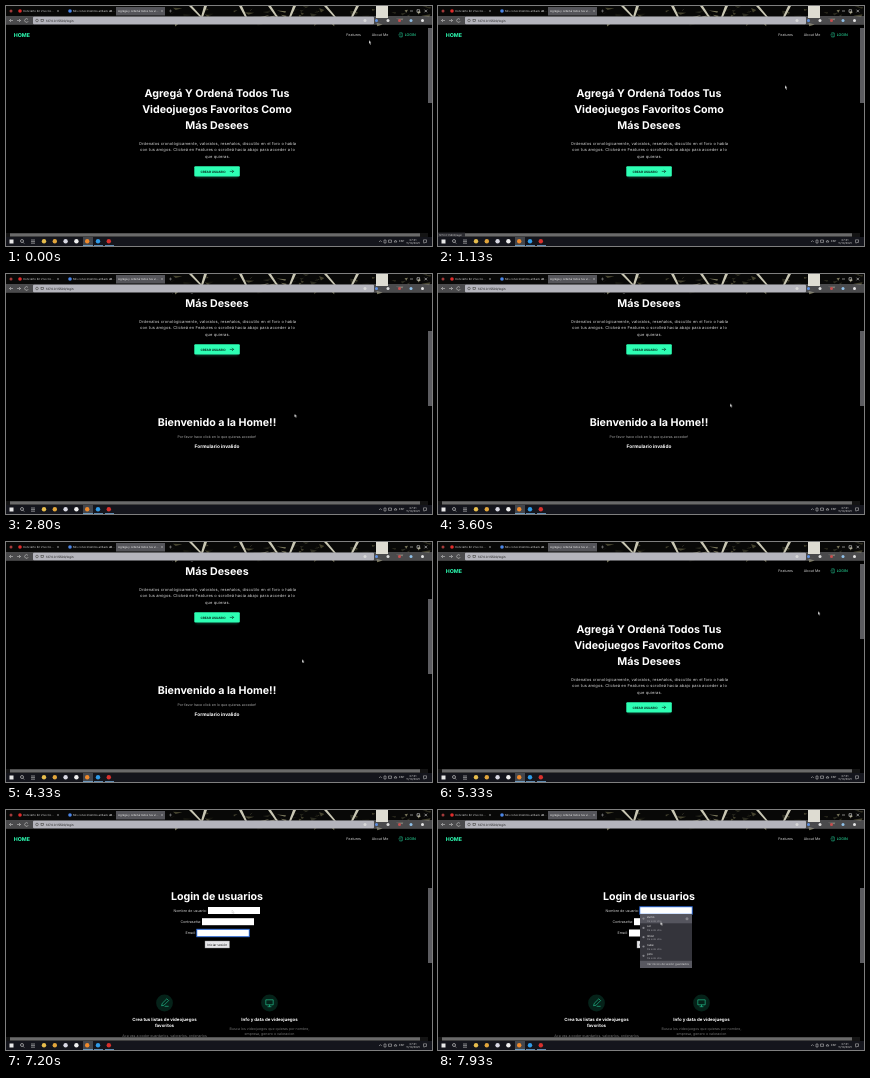
An HTML page that plays this animation: 426x240 px, repeating every 8000 ms.

```html
<!DOCTYPE html>
<html lang="es">
<head>
<meta charset="utf-8">
<title>Videojuegos</title>
<style>
  html, body { margin: 0; width: 100%; height: 100%; overflow: hidden; background: #000; }
  svg { display: block; width: 100vw; height: 100vh; }
  text { font-family: Inter, "Open Sans", sans-serif; font-size: 3.6px; fill: #d0d0d0; text-rendering: geometricPrecision; }
  .mid { text-anchor: middle; }
  .end { text-anchor: end; }
  .title { font-size: 10.67px; font-weight: 700; fill: #fff; }
  .lead { font-size: 4px; letter-spacing: .14px; fill: #d8d8d8; }
  .sub { font-size: 4.4px; font-weight: 700; fill: #fff; }
  .dim { font-size: 3.55px; fill: #737373; }
  .teal { fill: #2dffb4; }
  .small { font-size: 2.8px; }
  .line { fill: none; stroke: #2df0b2; stroke-width: .5; }
  .hidden { opacity: 0; }
</style>
</head>
<body>
<svg viewBox="0 0 426 240" preserveAspectRatio="none">
  <defs>
    <clipPath id="view"><rect y="19" width="422" height="208"/></clipPath>
    <filter id="glow" x="-30%" y="-60%" width="160%" height="250%"><feGaussianBlur stdDeviation="1"/></filter>
    <g id="nav">
      <text x="7.8" y="30.9" class="teal" style="font-size:5.3px;font-weight:700">HOME</text>
      <text x="340.3" y="30.3">Features</text>
      <text x="365.8" y="30.3">About Me</text>
      <path class="line" d="M393.6 27.5v-.6h2.6v4h-2.6v-.6M392.4 28.9h2.4"/>
      <text x="398.7" y="30.3" class="teal">LOGIN</text>
    </g>
  </defs>
  <rect width="426" height="240"/>

  <g clip-path="url(#view)">
    <g id="home">
      <g id="scroll">
        <use href="#nav"/>
        <g class="mid">
          <text x="211" y="91" class="title">Agregá Y Ordená Todos Tus</text>
          <text x="211" y="107" class="title">Videojuegos Favoritos Como</text>
          <text x="211" y="123" class="title">Más Desees</text>
          <text x="211.5" y="139" class="lead">Ordenalos cronológicamente, valoralos, reseñalos, discutilo en el foro o habla</text>
          <text x="211.5" y="145.4" class="lead">con tus amigos. Clickeá en Features o scrolleá hacia abajo para acceder a lo</text>
          <text x="211.5" y="151.8" class="lead">que quieras.</text>
        </g>
        <rect x="190" y="163" width="42" height="9" fill="#15805f" opacity=".4" filter="url(#glow)"/>
        <rect x="188.3" y="160.2" width="45.5" height="10.4" rx="1" fill="#2dffb4"/>
        <text x="194.4" y="166.5" style="font-size:3.1px;font-weight:700;fill:#06291f">CREAR USUARIO</text>
        <path d="M223.8 165.4h4M226 163.8l1.6 1.6l-1.6 1.6" fill="none" stroke="#06291f" stroke-width=".6"/>
        <g class="mid">
          <text x="211" y="242.4" class="title">Bienvenido a la Home!!</text>
          <text x="211" y="253.5" class="dim" style="fill:#a8a8a8">Por favor hace click en lo que quieras acceder!</text>
          <text x="211" y="264" class="sub" style="font-size:4.8px">Formulario invalido</text>
        </g>
      </g>
    </g>

    <g id="login" class="hidden">
      <use href="#nav"/>
      <text x="211" y="89.6" class="title mid">Login de usuarios</text>
      <text x="201" y="101.6" class="end">Nombre de usuario:</text>
      <text x="195" y="112.8" class="end">Contraseña:</text>
      <text x="189.6" y="124.2" class="end">Email:</text>
      <g fill="#fff">
        <rect x="202" y="97" width="52" height="7"/>
        <rect x="196" y="108.2" width="52" height="7"/>
        <rect x="191" y="119.5" width="52" height="7"/>
      </g>
      <rect x="199" y="131" width="24.5" height="7" fill="#e6e6e9" stroke="#888" stroke-width=".4"/>
      <text x="211.2" y="135.6" class="mid" style="font-size:3.2px;fill:#111">Iniciar sesión</text>
      <rect id="emailFocus" x="190.8" y="119.3" width="52.4" height="7.4" fill="none" stroke="#3b7cf0" stroke-width=".9"/>

      <circle cx="158.5" cy="193" r="8.4" fill="#052219"/>
      <path class="line" d="M155.6 195.8l.6-2.4l4.6-4.6l1.8 1.8l-4.6 4.6zM158.6 196.3h4"/>
      <circle cx="263.5" cy="193" r="8.4" fill="#052219"/>
      <path class="line" d="M259.8 189.8h7.4v5h-7.4zM263.5 194.8v1.8M261.6 196.7h3.8"/>
      <g class="mid">
        <text x="158.5" y="210.6" class="sub">Crea tus listas de videojuegos</text>
        <text x="158.5" y="217.2" class="sub">favoritos</text>
        <text x="158.5" y="227" class="dim">Aca vas a poder guardarlos, valorarlos, ordenarlos</text>
        <text x="263.5" y="210.6" class="sub">Info y data de videojuegos</text>
        <text x="263.5" y="219.8" class="dim">Busca los videojuegos que quieras por nombre,</text>
        <text x="263.5" y="225.4" class="dim">empresa, genero o valoracion</text>
      </g>
      <rect id="userFocus" class="hidden" x="201.8" y="96.8" width="52.4" height="7.4" fill="none" stroke="#3b7cf0" stroke-width=".9"/>
      <g id="menu" class="hidden">
        <rect x="202" y="104" width="52" height="54" fill="#34343b"/>
        <rect x="202" y="104" width="52" height="9.3" fill="#55555e"/>
        <rect x="202" y="150.8" width="52" height="7.2" fill="#585860"/>
        <circle cx="249" cy="108.7" r="1.5" fill="#85858c"/>
        <text x="209" y="155.4" class="small">Ver inicios de sesión guardados</text>
      </g>
    </g>
  </g>

  <g id="chrome">
    <g id="art"></g>
    <rect y="10" width="426" height="8.8" fill="#8c8c92" opacity=".5"/>
    <rect x="110" y="1" width="49" height="8.5" fill="#55555a"/>
    <circle cx="5" cy="5" r="1.5" fill="#a33b3b"/>
    <circle cx="14" cy="5" r="1.8" fill="#e02c2c"/>
    <text x="17" y="6.1" class="small">Concierto En Vivo Co…</text>
    <circle cx="64" cy="5" r="1.8" fill="#4b86e8"/>
    <text x="67" y="6.1" class="small">Mis conocimientos al Back en…</text>
    <text x="112" y="6.1" class="small" style="fill:#eee">Agregá y ordená todos tus vi…</text>
    <path d="M51 4l2 2m0-2l-2 2M104 4l2 2m0-2l-2 2M155 4l2 2m0-2l-2 2M163 5h3m-1.5-1.5v3" stroke="#bbb" stroke-width=".4"/>
    <rect x="27" y="10.8" width="341" height="7.4" rx="1" fill="#b4b4bc"/>
    <path d="M7 14.5H3.5l1.5-1.5m-1.5 1.5l1.5 1.5M11 14.5h3.5l-1.5-1.5m1.5 1.5l-1.5 1.5M22 13.5a1.8 1.8 0 1 0 .2 1.6" fill="none" stroke="#ddd" stroke-width=".5"/>
    <circle cx="31" cy="14.5" r="1.3" fill="none" stroke="#33332f" stroke-width=".5"/>
    <rect x="35" y="13.3" width="2.4" height="2.4" fill="none" stroke="#33332f" stroke-width=".5"/>
    <text x="40" y="15.6" style="font-size:3px;fill:#161616">127.0.0.1:5500/login</text>
    <rect x="370" y="0" width="12" height="12" fill="#dedcd2"/>
    <path d="M404 5h3M411 3.7h2.6v2.6H411zM418.5 3.7l2.6 2.6m0-2.6l-2.6 2.6" fill="none" stroke="#fff" stroke-width=".5"/>

    <rect id="thumb" x="422" y="22" width="4" height="75" fill="#5c5c60"/>
    <rect y="227" width="422" height="4" fill="#141414"/>
    <rect x="4" y="227.3" width="410" height="3.2" fill="#6a6a6a"/>
    <g id="status" class="hidden">
      <rect y="226.6" width="27" height="4.4" fill="#2b2b30"/>
      <text x="1" y="229.9" style="font-size:2.5px">127.0.0.1:5500/login</text>
    </g>

    <rect y="231" width="426" height="9" fill="#14151c"/>
    <rect x="77" y="231" width="10" height="9" fill="#43464c"/>
    <path d="M77 239.6h10M88 239.6h9M99 239.6h9" stroke="#7cb7e8" stroke-width=".8"/>
    <rect x="3.5" y="233.5" width="4" height="4" fill="#e8e8e8"/>
    <circle cx="16" cy="235" r="1.5" fill="none" stroke="#ddd" stroke-width=".6"/>
    <path d="M17 236.2l1.2 1.3M25 234h4M25 235.6h4M25 237.2h4" fill="none" stroke="#ccc" stroke-width=".6"/>
    <g id="apps"></g>
    <path d="M373 236l1.4-1.4l1.4 1.4M378 234h2v3h-2zM382.5 234h3v2.4h-3zM388 236l1.5-2l1.5 2z" fill="none" stroke="#ccc" stroke-width=".5"/>
    <text x="393" y="236.4" class="small">ESP</text>
    <text x="407" y="234.8" class="small mid">07:21</text>
    <text x="407" y="238.4" class="small mid">11/10/2021</text>
    <path d="M417.5 233.8h3v2.6h-1.5l-.8.9v-.9h-.7z" fill="none" stroke="#ccc" stroke-width=".5"/>
  </g>

  <path id="cursor" d="M0 0v3.2l.8-.7l.6 1.2l.5-.3l-.6-1.1h1z" fill="#fff" stroke="#111" stroke-width=".1"/>
</svg>
<script>
const LOOP = 8000;
const byId = id => document.getElementById(id);
const start = document.timeline.currentTime || 0;

function draw(parent, tag, attrs, content = '') {
  const node = document.createElementNS('http://www.w3.org/2000/svg', tag);
  for (const key in attrs) node.setAttribute(key, attrs[key]);
  node.textContent = content;
  byId(parent).append(node);
}

function play(id, frames) {
  const anim = byId(id).animate(frames, { duration: LOOP, iterations: Infinity });
  anim.startTime = start;
}

// steps: [ms, x, y]
const move = (id, steps, easing = 'ease-in-out') => play(id, steps.map(([t, x, y]) =>
  ({ offset: t / LOOP, transform: `translate(${x}px, ${y}px)`, easing })));

// steps: [ms, visible], each held until the next
const show = (id, steps) => play(id, [...steps, [LOOP, steps.at(-1)[1]]].map(([t, on]) =>
  ({ offset: t / LOOP, opacity: on, easing: 'step-end' })));

// Abstract browser theme: faint flecks and a few bright diagonal streaks
let seed = 11;
const rand = () => (seed = seed * 16807 % 2147483647) / 2147483647;
const tones = ['#15150f', '#2b2b20', '#45432f', '#77745a'];
draw('art', 'rect', { width: 426, height: 19, fill: '#080807' });
for (let i = 0; i < 70; i++) {
  const x = 165 + rand() * 260, y = rand() * 17;
  const w = 2 + rand() * 8, h = rand() * 4 - 2;
  draw('art', 'path', {
    d: `M${x} ${y}l${w} ${h}l${-w * rand()} ${1 + rand() * 2}z`,
    fill: tones[Math.floor(rand() * tones.length)]
  });
}
[[183, 10], [198, -4], [233, 5], [262, 7], [287, -5], [318, 9], [350, -6]].forEach(([x, lean]) =>
  draw('art', 'path', { d: `M${x} 0h3l${lean} 11h-2z`, fill: '#c9c7b4' }));

['#e7bd4d', '#e3a63c', '#d9d9e4', '#f0f0f0', '#f08a2c', '#2f9be8', '#d8302c'].forEach((fill, i) =>
  draw('apps', 'circle', { cx: 38 + i * 10.8, cy: 235.3, r: 2.2, fill }));
['#d8d8d8', '#5e8fe0', '#e0e0e0', '#c94f4f', '#8fc0e8', '#e6e6e6'].forEach((fill, i) =>
  draw('chrome', 'circle', { cx: 359 + i * 11.5, cy: 14.5, r: 1.5, fill }));

['zumo', 'sol', 'limon', 'nube', 'pino'].forEach((name, i) => {
  const y = 108 + i * 9.3;
  draw('menu', 'circle', { cx: 205.5, cy: y + .6, r: 1.1, fill: '#85858c' });
  draw('menu', 'text', { x: 209, y, class: 'small', style: 'fill:#eee' }, name);
  draw('menu', 'text', { x: 209, y: y + 3.6, style: 'font-size:2.5px;fill:#9a9aa0' }, 'De este sitio');
});

move('cursor', [
  [0, 363, 34.5], [450, 398, 29], [750, 396, 30], [1130, 347, 79.5], [1800, 300, 128],
  [2800, 288.5, 140], [3500, 292, 130], [4330, 296, 117.5], [4800, 325, 102],
  [5330, 380, 69.5], [5750, 400, 29], [6350, 398, 30], [7150, 226, 100],
  [7500, 226, 101], [7930, 222.5, 112], [8000, 222.5, 112]
]);
move('scroll', [
  [0, 0, 0], [1750, 0, 0], [2400, 0, -90], [4500, 0, -90], [5050, 0, 0], [8000, 0, 0]
]);
move('thumb', [
  [0, 0, 0], [1750, 0, 0], [2400, 0, 35], [4500, 0, 35], [5050, 0, 0],
  [6000, 0, 0], [6000, 0, 56], [8000, 0, 56]
]);
show('home', [[0, 1], [6000, 0]]);
show('login', [[0, 0], [6000, 1]]);
show('status', [[0, 0], [400, 1], [1270, 0], [5670, 1], [6530, 0]]);
show('emailFocus', [[0, 1], [7270, 0]]);
show('userFocus', [[0, 0], [7270, 1]]);
show('menu', [[0, 0], [7330, 1]]);
</script>
</body>
</html>
```
